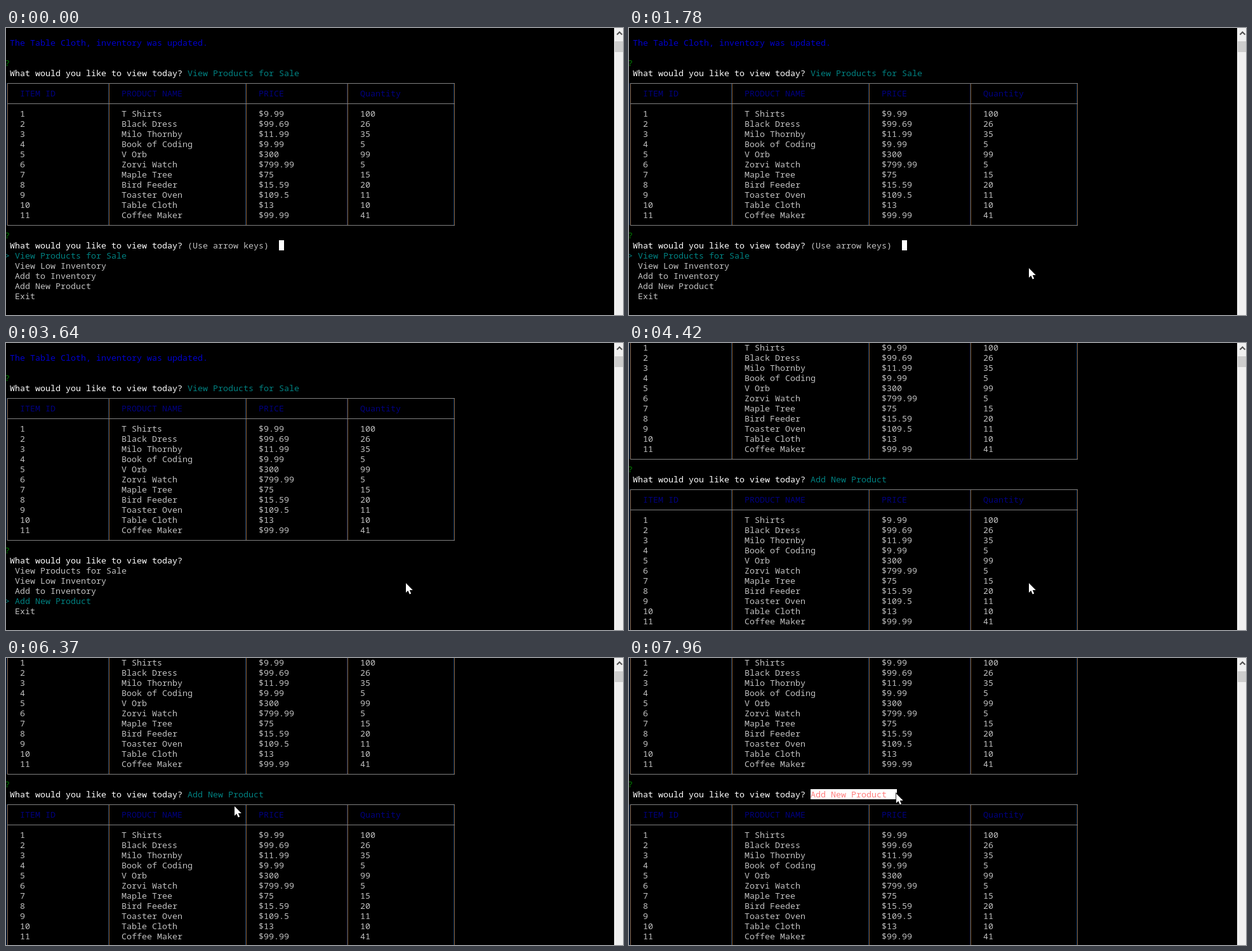
An HTML page with a canvas for the animation above (8000 ms loop, 972 by 453 pixels).

```html
<!DOCTYPE html>
<html lang="en">
<head>
<meta charset="utf-8">
<title>Inventory console</title>
<style>
html, body { margin: 0; width: 100%; height: 100%; overflow: hidden; background: #000; }
canvas { display: block; }
</style>
</head>
<body>
<canvas id="stage" width="972" height="453"></canvas>
<script>
const ctx = document.getElementById('stage').getContext('2d');
const GRAY = '#c0c0c0', WHITE = '#fff', TEAL = '#008080', GREEN = '#008000', NAVY = '#000080';
const LOOP = 8000, FIRST_KEY = 2560, KEY_GAP = 540;
const SCROLL_AT = 4420, PRESS_AT = 7080, RELEASE_AT = 7960;

const QUESTION = 'What would you like to view today?';
const OPTIONS = ['View Products for Sale', 'View Low Inventory', 'Add to Inventory', 'Add New Product', 'Exit'];
const HEADERS = ['ITEM ID', 'PRODUCT NAME', 'PRICE', 'Quantity'];
const ITEMS = `T Shirts,$9.99,100
Black Dress,$99.69,26
Milo Thornby,$11.99,35
Book of Coding,$9.99,5
V Orb,$300,99
Zorvi Watch,$799.99,5
Maple Tree,$75,15
Bird Feeder,$15.59,20
Toaster Oven,$109.5,11
Table Cloth,$13,10
Coffee Maker,$99.99,41`.split('\n').map((line, i) => [i + 1, ...line.split(',')]);
const BORDERS = [0, 20, 47, 67, 88];

// Pointer glides: start, end, destination
const GLIDES = [
  [130, 360, 297, 408],
  [680, 760, 260, 387],
  [910, 990, 242, 362],
  [1080, 1550, 630, 379],
  [5660, 6050, 387, 291],
  [6220, 6700, 286, 214],
  [7250, 7650, 421, 214]
];
const POINTER_STEP = 75;

// Character cells are 8 by 16 pixels
const cellX = col => col * 8 - 2;
const cellY = row => row * 16 - 1;

function rect(color, x, y, w, h) {
  ctx.fillStyle = color;
  ctx.fillRect(x, y, w, h);
}

function text(str, col, row, color) {
  ctx.fillStyle = color;
  ctx.fillText(str, cellX(col), cellY(row) + 13);
}

function table(row) {
  const top = cellY(row) + 8, bottom = top + 14 * 16;
  for (const col of BORDERS) {
    // Subpixel fringe: blue on the left, brown on the right
    const x = cellX(col) + 4;
    rect('#002d60', x - 1, top, 1, bottom - top);
    rect('#8c5a28', x, top, 1, bottom - top);
  }
  for (const y of [top, top + 32, bottom]) rect('#808080', 2, y, 705, 1);
  const line = (cells, r, color) => cells.forEach((c, i) => text(c, BORDERS[i] + 3, r, color));
  line(HEADERS, row + 1, NAVY);
  ITEMS.forEach((item, i) => line(item, row + 3 + i, GRAY));
}

function prompt(row, answer = '') {
  text('?', 0, row, GREEN);
  text(QUESTION, 1, row + 1, WHITE);
  text(answer, 36, row + 1, TEAL);
}

function menuScreen(t) {
  const presses = Math.floor((t - FIRST_KEY) / KEY_GAP) + 1;
  const selected = Math.min(3, Math.max(0, presses));
  text('The Table Cloth, inventory was updated.', 1, 1, '#0000cc');
  prompt(3, OPTIONS[0]);
  table(5);
  prompt(20);
  if (!selected) {
    text('(Use arrow keys)', 36, 21, GRAY);
    rect(WHITE, cellX(54), cellY(21), 8, 16);
  }
  OPTIONS.forEach((option, i) => text(option, 2, 22 + i, i === selected ? TEAL : GRAY));
  text('>', 0, 22 + selected, TEAL);
}

function productScreen(t, mouse) {
  table(-3);
  prompt(12, OPTIONS[3]);
  table(14);
  if (t >= PRESS_AT) {
    const count = Math.floor((mouse.x + 2) / 8) - 35;
    rect(WHITE, cellX(36), cellY(13), count * 8, 16);
    text(OPTIONS[3].slice(0, count), 36, 13, '#ff7f7f');
  }
}

function scrollbar() {
  rect('#f0f0f0', 958, 0, 14, 453);
  rect('#cdcdcd', 959, 21, 13, 17);
  ctx.strokeStyle = '#505050';
  ctx.lineWidth = 2;
  ctx.beginPath();
  ctx.moveTo(962.5, 10.5);
  ctx.lineTo(966.5, 6.5);
  ctx.lineTo(970.5, 10.5);
  ctx.stroke();
}

// Each glide is an arc in coarse steps: x eases in, y eases out
function mouseAt(t) {
  const pos = { x: 301, y: 440 };
  for (const [start, end, x, y] of GLIDES) {
    if (t < start) break;
    const steps = Math.floor((t - start) / POINTER_STEP) + 1;
    const p = Math.min(1, steps * POINTER_STEP / (end - start + POINTER_STEP));
    pos.x += Math.round((x - pos.x) * p ** 1.45);
    pos.y += Math.round((y - pos.y) * (1 - (1 - p) ** 2.6));
  }
  return pos;
}

const arrow = new Path2D('M0 0V15L3.3 11.8 5.8 17.5 8.2 16.5 5.8 10.9H10.8Z');

function pointer(t, { x, y }) {
  if (t >= PRESS_AT && t < RELEASE_AT) {
    ctx.fillStyle = 'rgba(255,240,0,.55)';
    ctx.beginPath();
    ctx.arc(x, y - 1, 12, 0, Math.PI * 2);
    ctx.fill();
  }
  ctx.save();
  ctx.translate(x, y);
  ctx.strokeStyle = '#000';
  ctx.lineWidth = 1.6;
  ctx.stroke(arrow);
  ctx.fillStyle = WHITE;
  ctx.fill(arrow);
  ctx.restore();
}

function draw() {
  const t = performance.now() % LOOP;
  const mouse = mouseAt(t);
  rect('#000', 0, 0, 972, 453);
  ctx.font = '13.3333px "Noto Sans Mono", "DejaVu Sans Mono", monospace';
  if (t < SCROLL_AT) menuScreen(t);
  else productScreen(t, mouse);
  scrollbar();
  if (t >= GLIDES[0][0]) pointer(t, mouse);
  requestAnimationFrame(draw);
}
draw();
</script>
</body>
</html>
```
